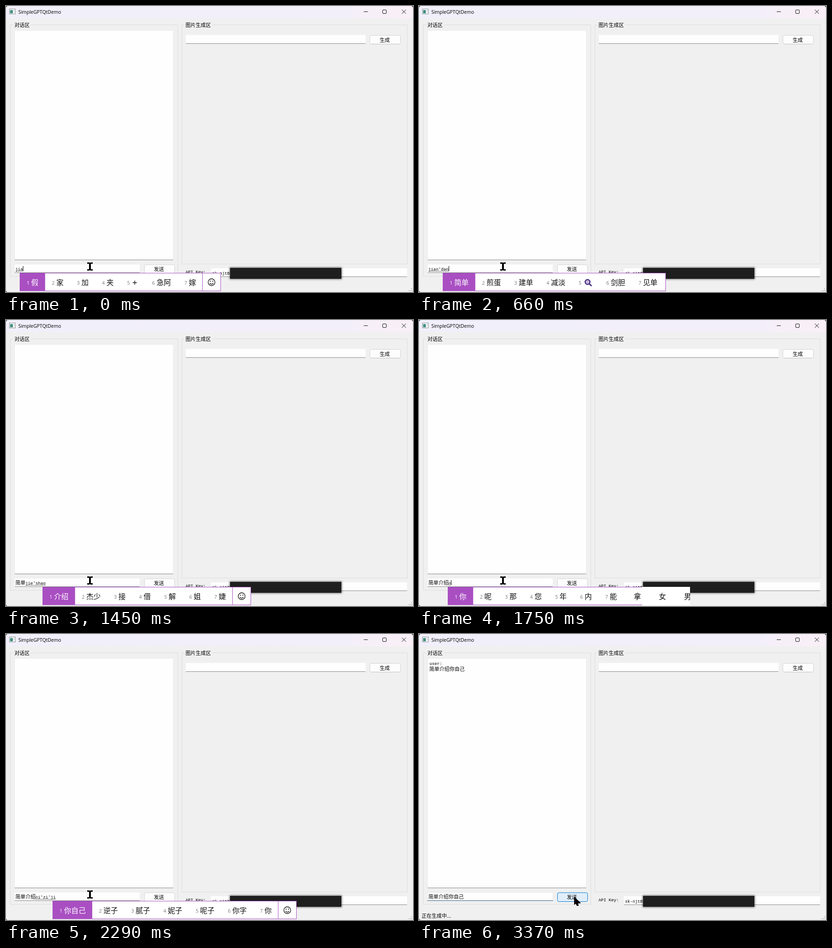
Recreate the animation shown at these times as an HTML page. Size 892 by 628 pixels, loop 8 s.

```html
<!DOCTYPE html>
<html lang="zh">
<head>
<meta charset="utf-8">
<title>SimpleGPTQtDemo</title>
<style>
html, body { margin: 0; width: 892px; height: 628px; overflow: hidden; background: #f0f0f0; }
svg { display: block; }
text { font: 11.1px "Noto Sans CJK SC", "Noto Sans CJK", sans-serif; fill: #000; white-space: pre; }
.mono { font: 9.25px "Liberation Mono", monospace; }
.title { font: 10.45px "Open Sans", "Noto Sans", sans-serif; }
.cand { font-size: 15.8px; fill: #111; }
.num { font: 10.5px "Open Sans", "Noto Sans", sans-serif; fill: #777; }
.on { fill: #fff; }
.btn { fill: #fdfdfd; stroke: #d2d2d2; }
.group { fill: none; stroke: #dcdcdc; }
.icon { fill: none; stroke: #111; }
</style>
</head>
<body>
<svg id="stage" width="892" height="628" viewBox="0 0 892 628">
  <defs>
    <linearGradient id="bar" x2="1" y2="0">
      <stop offset="0" stop-color="#f1effa"/><stop offset=".84" stop-color="#f2effa"/>
      <stop offset=".88" stop-color="#f7eff8"/><stop offset="1" stop-color="#f8eff7"/>
    </linearGradient>
    <filter id="soft" x="-5%" y="-50%" width="110%" height="200%"><feGaussianBlur stdDeviation="2.2"/></filter>
  </defs>
  <rect width="892" height="628" fill="#f0f0f0"/>
  <rect width="892" height="27" fill="url(#bar)"/>
  <path d="M0 0H5Q0 0 0 5ZM892 0H887Q892 0 892 5ZM0 628V624Q0 628 4 628Z" fill="#333"/>
  <rect x="7.5" y="6.5" width="13" height="11" fill="#f8f8f8" stroke="#8a9296"/>
  <rect x="9" y="9" width="6" height="7" fill="#3f8f85"/>
  <path d="M17 9.5h2M17 12.5h2" stroke="#a5b0b4"/>
  <text class="title" x="27" y="16.5">SimpleGPTQtDemo</text>
  <path class="icon" d="M784 12.5h9M867.5 8l9 9m0-9l-9 9"/>
  <rect class="icon" x="825.5" y="8.5" width="8" height="8" rx="1.5"/>

  <rect class="group" x="9.5" y="41.5" width="367" height="552"/>
  <rect class="group" x="385.5" y="41.5" width="494" height="525"/>
  <path d="M16 41.5h39M391 41.5h61" stroke="#f0f0f0" stroke-width="3"/>
  <text x="18.5" y="45.5">对话区</text>
  <text x="393.5" y="45.5">图片生成区</text>

  <rect x="19" y="54" width="347.5" height="504" fill="#fefefe" stroke="#e6e6e6" stroke-width=".6"/>
  <path d="M19 557.5h347.5M394 82.5h394" stroke="#878787"/>
  <rect x="394" y="63.5" width="394" height="18.5" fill="#fefefe"/>
  <rect class="btn" x="797.5" y="64.5" width="67" height="19" rx="3"/>
  <path d="M800 83.5h62" stroke="#bdbdbd"/>
  <text x="819" y="78.6">生成</text>

  <text class="mono" x="393.5" y="587">API Key:</text>
  <rect x="449" y="576" width="430" height="18" fill="#fefefe"/>
  <path d="M449 594.5h430" stroke="#878787"/>
  <text class="mono" x="451.5" y="590">sk-njtBl</text>
  <rect x="490" y="574" width="246" height="26" fill="#000" opacity=".55" filter="url(#soft)"/>
  <rect x="491" y="575" width="244" height="24" fill="#1e1e1e"/>
  <path d="M889 620v2m0 2v2m-3-2v2m-3 0v-1.5" stroke="#b8b8b8" stroke-width="2" stroke-dasharray="2 1.5"/>

  <g id="live"></g>
</svg>
<script>
const LOOP = 8000, CH = 11, LAT = 5.55, PURPLE = '#a94fc2';
const live = document.getElementById('live');

// time, committed text, pinyin, caret, bar x, candidates, layout options
const typing = [
  [0, '', 'jia', 1, 30, '假 家 加 夹 + 急阿 嫁'],
  [150, '', 'jia', 0, 30, '假 家 加 夹 + 急阿 嫁'],
  [420, '', 'jian', 1, 36, '见 间 件 建 减 键 简'],
  [540, '', "jian'd", 1, 44, '简单的 简单点 间断 简短 尖端 见到 减掉', { end: 578 }],
  [660, '', "jian'dan", 1, 52, '简单 煎蛋 建单 减淡 @ 剑胆 见单', { end: 541, plain: true }],
  [810, '', "jian'dan", 1, 52, '简单 煎蛋 建单 减淡 @ 剑胆 见单', { end: 541 }],
  [930, '简单', '', 1],
  [1060, '简单', 'ji', 1, 47, '及 即 级 几 机 记 集'],
  [1200, '简单', 'jie', 1, 53, '接 解 姐 节 结 界 借'],
  [1330, '简单', "jie'sh", 0, 68, '介绍 结束 接受 解释 接收 结识 就是', { end: 563, plain: true }],
  [1450, '简单', "jie'shao", 0, 80, '介绍 杰少 接 借 解 姐 婕'],
  [1600, '简单介绍', '', 1],
  [1750, '简单介绍', 'n', 1, 63, '你 呢 那 您 年 内 能', { extra: '拿女男', wide: 594 }],
  [1900, '简单介绍', 'ni', 1, 70, '你 呢 泥 尼 拟 逆 腻'],
  [2020, '简单介绍', "ni'z", 1, 84, '你自己 你怎么 你在 你做 你这 你知 你总', { end: 617 }],
  [2170, '简单介绍', "ni'zi", 0, 89, '逆子 你自 腻子 妮子 呢子 你字 拟子'],
  [2290, '简单介绍', "ni'zi'ji", 0, 102, '你自己 逆子 腻子 妮子 呢子 你字 你'],
  [2410, '简单介绍你自己', '', 1],
  [2680, '简单介绍你自己', '', 0]
];
// time, cursor shape, x, y
const pointer = [
  [0, 'beam', 184, 572], [2680, 'beam', 217, 573], [2800, 'beam', 258, 575],
  [2950, 'arrow', 318, 577], [3070, 'arrow', 340, 577]
];

const at = (list, t) => list.filter(s => s[0] <= t).pop();
const text = (x, y, s, cls = '') => `<text x="${x}" y="${y}" class="${cls}">${s}</text>`;
const rect = (x, y, w, h, fill, more = '') =>
  `<rect x="${x}" y="${y}" width="${w}" height="${h}" fill="${fill}" ${more}/>`;
const line = (d, stroke, more = '') => `<path d="${d}" fill="none" stroke="${stroke}" ${more}/>`;

function field(done, pinyin, caret, focus) {
  const x = 20.5 + done.length * CH, end = x + pinyin.length * LAT;
  let s = rect(19, 567.5, 274, 18, '#fefefe');
  s += focus ? rect(18.5, 567.5, 275, 18, 'none', 'stroke="#e3e3e3" stroke-width=".6"') + line('M18 585.5H294', '#315b80')
             : line('M19 585.5H293', '#878787');
  s += text(20.5, 581, done) + text(x, 580.5, pinyin, 'mono');
  if (pinyin) s += line(`M${x + .5} 582.5H${end}`, '#222', 'stroke-dasharray="1.5 1"');
  if (caret) s += rect(Math.round(end), 571, 1, 11, '#000');
  return s;
}

function sendButton(state) {
  const [fill, edge] = { idle: ['#fdfdfd', '#d2d2d2'], hover: ['#e0eef9', '#0078d4'], down: ['#cce4f7', '#005499'] }[state];
  return rect(303.5, 568, 66, 19.5, fill, `stroke="${edge}" rx="3"`) +
    (state === 'idle' ? line('M306 587.5h61', '#bdbdbd') : '') + text(324, 581.7, '发送');
}

function lens(x) {
  return `<circle cx="${x - 1}" cy="606" r="5.2" fill="#c9b7dd" stroke="#44317c" stroke-width="2.6"/>` +
    line(`M${x + 3} 610l4 4`, '#44317c', 'stroke-width="3" stroke-linecap="round"');
}

function smile(x) {
  return `<circle class="icon" cx="${x}" cy="606.5" r="7.5" stroke-width="1.3"/>` +
    `<circle cx="${x - 2.7}" cy="604.3" r="1.1"/><circle cx="${x + 2.7}" cy="604.3" r="1.1"/>` +
    line(`M${x - 4} 608.5q4 4.6 8 0`, '#111', 'stroke-width="1.2"');
}

function candidates(x0, words, { end, plain, extra = '', wide } = {}) {
  let x = x0, cells = '';
  words.split(' ').forEach((w, i) => {
    const size = w === '@' ? 60.6 : 39.3 + 15.65 * w.length, on = i ? '' : ' on';
    if (!i) cells += rect(x, 586, size + .8, 40, PURPLE);
    cells += text(x + 15.6, 611.5, i + 1, 'num' + on);
    if (w === '@') cells += lens(x + 36);
    else if (w === '+') cells += line(`M${x + 28} 607.5h9m-4.5-4.5v9`, '#111', 'stroke-width="1.3"');
    else cells += text(x + 25.3, 612.8, w, 'cand' + on);
    x += size;
  });
  const edge = Math.round(end || x), frame = edge + (plain ? 0 : 41), right = wide || frame;
  [...extra].forEach((c, i) => { cells += text(x + 23 + i * 55, 612.8, c, 'cand'); });
  if (!plain && !wide) cells += line(`M${edge + .5} 586v40`, PURPLE) + smile(edge + 20.5);
  cells += line(`M${x0} 586.5H${frame}M${x0} 625.5H${frame}M${x0 + .5} 586v40`, PURPLE);
  if (!wide) cells += line(`M${right - .5} 586v40`, PURPLE);
  const w = right - x0;
  return `<svg x="${x0}" y="586" width="${w}" height="40" viewBox="${x0} 586 ${w} 40">` +
    rect(x0, 586, w, 40, '#fff') + cells + '</svg>';
}

function cursor(kind, x, y) {
  const d = kind === 'beam'
    ? 'M-6-9h4.500l1.500 1l1.500-1h4.500v3h-4v12h4v3h-4.500l-1.500-1l-1.500 1h-4.500v-3h4v-12h-4z'
    : 'M0 0V18L3.500 15L6 20H10L8.500 14.500H14V13z';
  return `<path transform="translate(${x} ${y})" d="${d}"/>`;
}

function render(t) {
  const [, done, pinyin, caret, x, words, opts] = at(typing, t);
  const button = t < 2950 ? 'idle' : t >= 3220 && t < 3370 ? 'down' : 'hover';
  let s = field(done, pinyin, caret, t >= 2950) + sendButton(button);
  if (t >= 3220) s += text(23, 67.5, 'user:', 'mono') + text(22.5, 81.3, done) + text(5.5, 623.3, '正在生成中...');
  if (words) s += candidates(x, words, opts);
  return s + cursor(...at(pointer, t).slice(1));
}

let shown = '';
function tick() {
  const next = render(performance.now() % LOOP);
  if (next !== shown) live.innerHTML = shown = next;
  requestAnimationFrame(tick);
}
tick();
</script>
</body>
</html>
```
